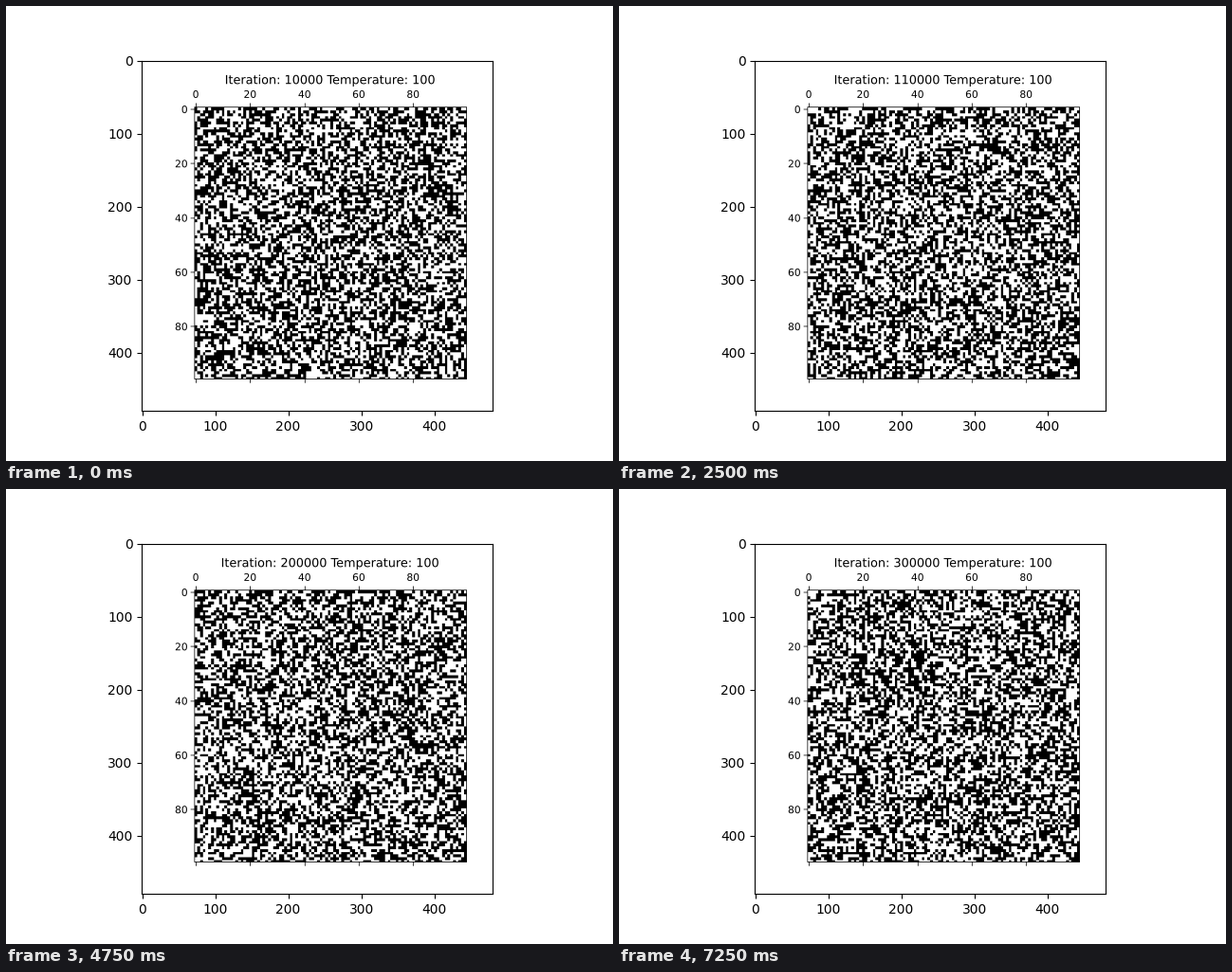
A matplotlib script for the animation above (7.5 s loop, 640x480 px).

```python
import numpy as np
import matplotlib.pyplot as plt
from matplotlib.animation import FuncAnimation
from matplotlib.patches import PathPatch
from matplotlib.textpath import TextPath
from matplotlib.transforms import Affine2D

SIZE = 100          # spins per side
STEPS = 10_000      # flips tried per frame
FRAMES = 30
TEMPERATURE = 100

# The nested plot is a picture of its own, measured in its own pixels.
PAGE = 480
SIDE = 372
LEFT, TOP = 72, 65
RIGHT, BOTTOM = LEFT + SIDE, TOP + SIDE
POINT = 100 / 72
TICK = 5
LABELS = range(0, SIZE, 20)


def evolve(seed=7):
    """Return one spin lattice per frame; so hot that every flip is accepted."""
    rng = np.random.default_rng(seed)
    spins = rng.integers(0, 2, (SIZE, SIZE))
    states = []
    for _ in range(FRAMES):
        # The last row and column are never picked.
        rows, cols = rng.integers(0, SIZE - 1, (2, STEPS))
        flips = np.zeros_like(spins)
        np.add.at(flips, (rows, cols), 1)
        spins = (spins + flips) % 2
        states.append(spins)
    return states


def tick_offset(value):
    """Distance of a cell's centre from the lattice edge."""
    return (value + 0.5) * SIDE / SIZE


def draw_page(spins):
    """Paint lattice, frame and ticks as they look before shrinking."""
    page = np.ones((PAGE, PAGE))
    cell = np.arange(SIDE) * SIZE // SIDE
    page[TOP:BOTTOM, LEFT:RIGHT] = spins[np.ix_(cell, cell)]
    page[[TOP - 1, BOTTOM - 1], LEFT:RIGHT + 1] = 0
    page[TOP - 1:BOTTOM, [LEFT, RIGHT]] = 0
    for value in LABELS:
        x = round(LEFT + tick_offset(value))
        y = round(TOP + tick_offset(value))
        page[TOP - 1 - TICK:TOP, x] = 0
        page[BOTTOM - 1:BOTTOM + TICK, x] = 0
        page[y, LEFT - TICK:LEFT] = 0
    return page


def text_path(text, points, x, y, align=0.5):
    """Outline of a text on baseline y; align 0.5 centres it, 1 ends it at x."""
    path = TextPath((0, 0), text, size=points * POINT)
    box = path.get_extents()
    move = Affine2D().translate(-box.x0 - align * box.width, 0)
    return move.scale(1, -1).translate(x, y).transform_path(path)


def title_path(frame):
    text = f"Iteration: {(frame + 1) * STEPS} Temperature: {TEMPERATURE}"
    return text_path(text, 12, LEFT + SIDE / 2 - 0.5, 31.5)


def add_text(path):
    return outer.add_patch(PathPatch(path, facecolor="black", linewidth=0))


fig, outer = plt.subplots(figsize=(6.4, 4.8), dpi=100)
states = evolve()
image = outer.imshow(draw_page(states[0]), cmap="gray", vmin=0, vmax=1,
                     interpolation="antialiased")
title = add_text(title_path(0))
for value in LABELS:
    offset = tick_offset(value)
    add_text(text_path(str(value), 10, LEFT + offset - 0.5, 50.5))
    add_text(text_path(str(value), 10, LEFT - 10.5, TOP + offset + 4.5, align=1))
outer.set(xlim=(-0.5, PAGE - 0.5), ylim=(PAGE - 0.5, -0.5))
outer.set_xticks(range(0, PAGE, 100))
outer.set_yticks(range(0, PAGE, 100))


def update(frame):
    image.set_data(draw_page(states[frame]))
    title.set_path(title_path(frame))
    return image, title


anim = FuncAnimation(fig, update, frames=FRAMES, interval=250, repeat=True)
plt.show()
```
